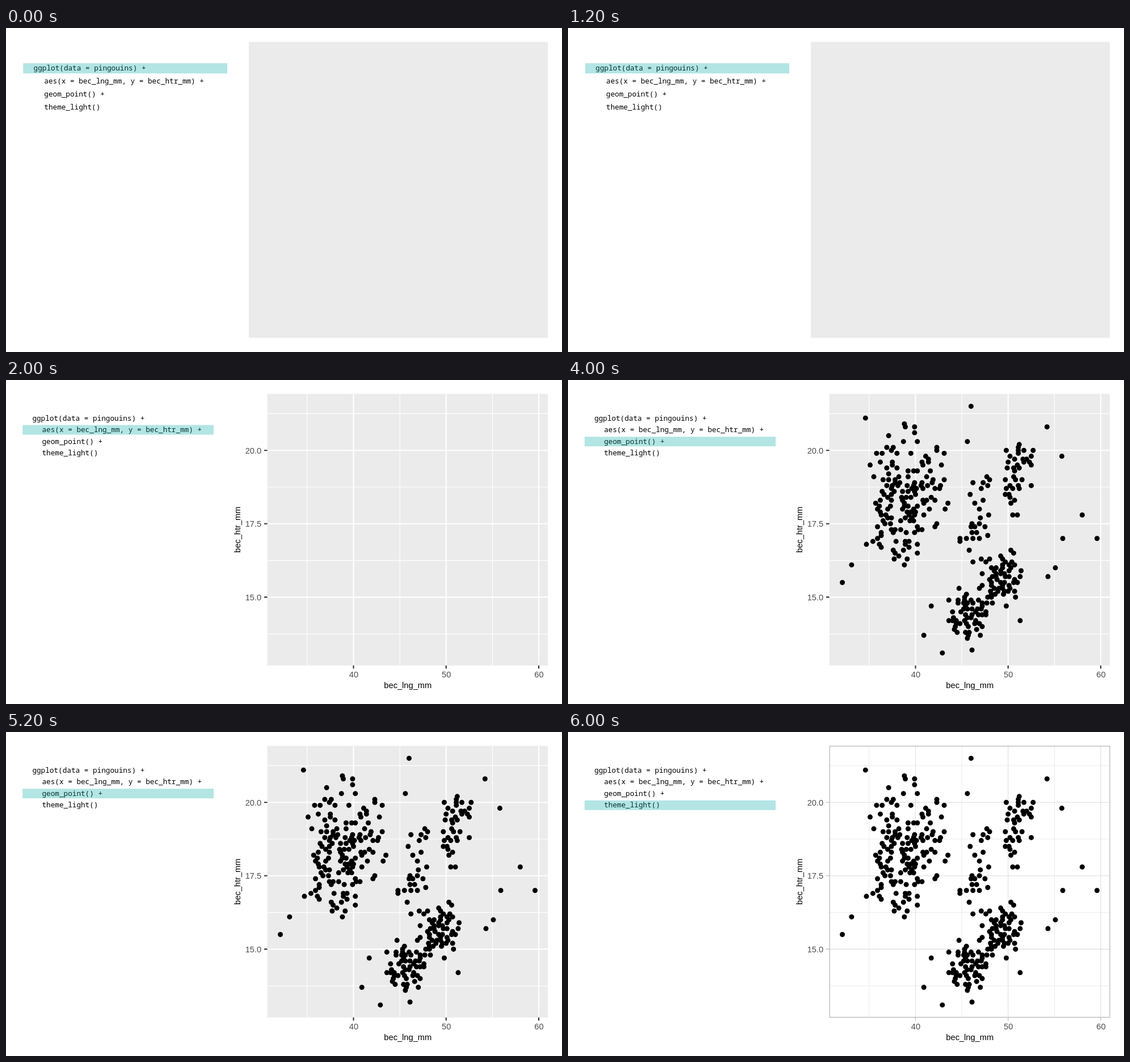
An HTML page that plays this animation: 980 by 572 pixels, repeating every 8000 ms.

```html
<!DOCTYPE html>
<html lang="fr">
<head>
<meta charset="utf-8">
<style>
  html, body { margin: 0; height: 100%; overflow: hidden; background: #fff; }
  svg { display: block; width: 980px; height: 572px; }
  .code { font: 12.7px "Noto Sans Mono", "DejaVu Sans Mono", monospace; white-space: pre; }
  .axis { font: 14.67px "Liberation Sans", Arial, sans-serif; }
</style>
</head>
<body>
<svg id="stage" viewBox="0 0 980 572"></svg>
<script>
const stage = document.getElementById('stage');
const LINES = ['ggplot(data = pingouins) +', 'aes(x = bec_lng_mm, y = bec_htr_mm) +', 'geom_point() +', 'theme_light()'];
const L = 460.6, R = 955, T = 24.5, B = 503.9;
const px = mm => 612.5 + (mm - 40) * 16.325;
const py = mm => 124.2 - (mm - 20) * 51.84;

// Isolated observations: length, height in mm
const OUTLIERS = [
  [46, 21.5], [34.6, 21.1], [33.1, 16.1], [32.1, 15.5], [54.2, 20.8], [55.8, 19.8],
  [58, 17.8], [55.9, 17], [59.6, 17], [55.1, 16], [54.3, 15.7], [45.6, 20.3],
  [42.9, 13.1], [46.1, 13.2], [40.9, 13.7], [41.7, 14.7], [51.3, 14.2]
];

// Dense groups: count, mean length, mean height, their spreads, correlation
const GROUPS = [
  [148, 38.9, 18.45, 2.4, 1.2, .2],
  [38, 50.8, 19.1, 1, .7, .2],
  [28, 46.4, 17.7, 1, .8, .2],
  [58, 45.8, 14.45, 1.4, .5, .2],
  [54, 49.2, 15.65, 1.3, .5, .2]
];

let seed = 17;
const rand = () => (seed = seed * 16807 % 2147483647) / 2147483647;

// Scatter normally inside an ellipse, keeping new dots a little apart
function scatter(points, [n, mx, my, sx, sy, r]) {
  for (const end = points.length + n; points.length < end;) {
    const d = Math.sqrt(-2 * Math.log(rand())), a = rand() * 2 * Math.PI;
    if (d > 2.1) continue;
    const u = d * Math.cos(a), v = r * u + Math.sqrt(1 - r * r) * d * Math.sin(a);
    const x = Math.round((mx + sx * u) * 10) / 10, y = Math.round((my + sy * v) * 10) / 10;
    const apart = ([p, q]) => Math.hypot(px(x) - px(p), py(y) - py(q)) > 5;
    if (points.every(apart)) points.push([x, y]);
  }
  return points;
}

const rect = (x, y, w, h, fill, more = '') =>
  `<rect x="${x}" y="${y}" width="${w}" height="${h}" fill="${fill}" ${more}/>`;
const path = (d, color, width) => `<path d="${d}" stroke="${color}" stroke-width="${width}" fill="none"/>`;
const label = (x, y, text, more) => `<text class="axis" x="${x}" y="${y}" ${more}>${text}</text>`;
const grid = (xs, ys) => xs.map(x => `M${px(x)} ${T}V${B}`).join('') + ys.map(y => `M${L} ${py(y)}H${R}`).join('');

const XS = [40, 50, 60], YS = [20, 17.5, 15];
const MAJOR = grid(XS, YS);
const MINOR = grid(XS.map(x => x - 5), [22.5, ...YS].map(y => y - 1.25));
const TICKS = XS.map(x => `M${px(x)} ${B}v5.6`).join('') + YS.map(y => `M${L} ${py(y)}h-5.6`).join('');
const LABELS =
  XS.map(x => label(px(x) + .4, 525.2, x, 'fill="#4d4d4d" text-anchor="middle"')).join('') +
  YS.map(y => label(450.2, py(y) + 5.4, y.toFixed(1), 'fill="#4d4d4d" text-anchor="end"')).join('') +
  label(708.3, 544, 'bec_lng_mm', 'text-anchor="middle"') +
  label(0, 0, 'bec_htr_mm', 'text-anchor="middle" transform="translate(412.6 264.2) rotate(-90)"');
const POINTS = GROUPS.reduce(scatter, OUTLIERS)
  .map(([x, y]) => `<circle cx="${px(x)}" cy="${py(y)}" r="4.5"/>`).join('');

function code(step) {
  const first = step === 0;
  const x = first ? 48.6 : 46.4, base = first ? 75.3 : 71.6;
  const indent = first ? 18.7 : 17.1, pitch = first ? 22.75 : 20.63;
  const text = LINES.map((s, i) =>
    `<text class="code" x="${x + (i ? indent : 0)}" y="${base + i * pitch}">${s}</text>`).join('');
  const bar = first ? [30.3, 62.2, 359.7, 18] : [29.3, 58.9 + step * pitch, 336.7, 17];
  return text + rect(...bar, 'rgba(0,170,165,.3)');
}

function plot(step) {
  if (step === 0) return rect(428, T, 527, 522.4, '#ebebeb');
  const light = step === 3, line = light ? '#dedede' : '#fff';
  return rect(L, T, R - L, B - T, light ? '#fff' : '#ebebeb') +
    path(MINOR, line, light ? .6 : 1.07) +
    path(MAJOR, line, light ? 1.07 : 2.13) +
    (step > 1 ? POINTS : '') +
    (light ? rect(L + .5, T + .5, R - L - .6, B - T - .8, 'none', 'stroke="#b3b3b3" stroke-width="1.2"') : '') +
    path(TICKS, light ? '#b3b3b3' : '#333', light ? 1.07 : 2.13) + LABELS;
}

let shown = -1;
const start = performance.now();
function draw(now) {
  const step = Math.floor(Math.max(0, now - start) % 8000 / 2000);
  if (step !== shown) stage.innerHTML = code(step) + plot(step);
  shown = step;
  requestAnimationFrame(draw);
}
draw(start);
</script>
</body>
</html>
```
